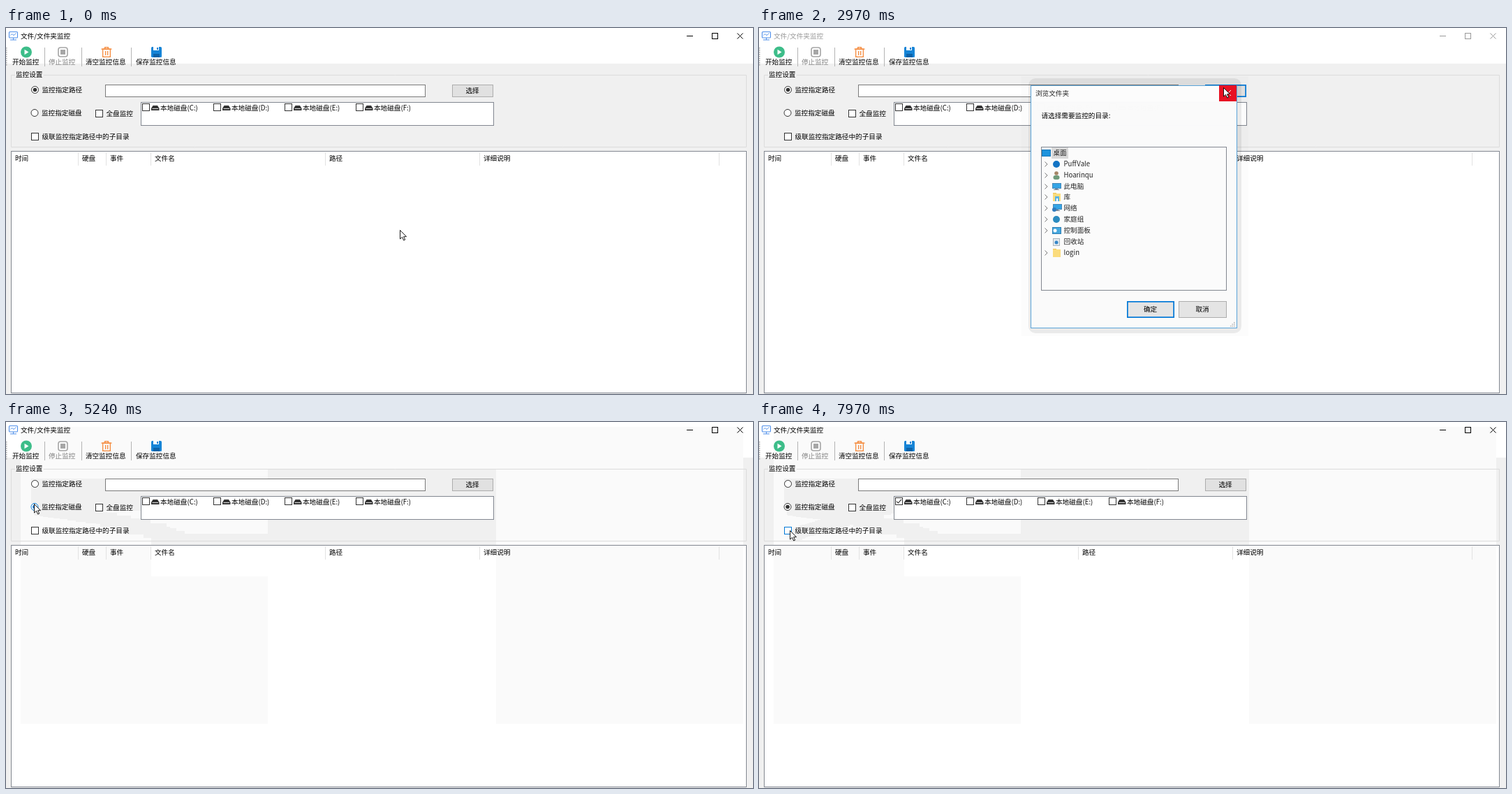
Animation of 1070x524 px, one loop 8000 ms. Source, as an HTML page with a canvas:

```html
<!DOCTYPE html>
<html lang="zh-CN">
<head>
<meta charset="utf-8">
<style>
html, body { margin: 0; width: 100%; height: 100%; overflow: hidden; background: #f0f0f0; }
canvas { display: block; }
</style>
</head>
<body>
<canvas id="stage" width="1070" height="524"></canvas>
<script>
const c = document.getElementById('stage').getContext('2d');
const LOOP = 8000, BLUE = '#0078d7', STEP = 30;
const OPEN = 1730, CLOSE = 2970, PICK_DISKS = 5240, TICK_C = 6460;
const FONT = '9.65px "Noto Sans CJK SC", "Noto Sans CJK", "Noto Sans", sans-serif';
const clamp = v => Math.max(0, Math.min(1, v));
const easeOut = k => 1 - (1 - clamp(k)) ** 2;

// pointer moves: start, end, and where it goes
const MOVES = [
  [400, 940, 664, 69], [1150, 1420, 665, 85],
  [CLOSE, 3490, 643, 145], [3490, 3770, 316, 193],
  [4010, 4220, 220, 150], [4360, 4510, 129, 129], [4680, 5020, 40, 117],
  [5630, 6360, 196, 110], [6970, 7760, 57, 149], [7790, 7970, 44, 155]
];
function cursorAt(t) {
  let x = 564, y = 289;
  for (const [from, to, nx, ny] of MOVES) {
    const k = easeOut((t - from) / (to - from));
    x += (nx - x) * k;
    y += (ny - y) * k;
  }
  return [Math.round(x), Math.round(y)];
}

const COLUMNS = [['时间', 96], ['硬盘', 40], ['事件', 64], ['文件名', 250], ['路径', 221], ['详细说明', 343]];
let edge = 8;
const headers = COLUMNS.map(([label, width]) => ({ label, width, left: (edge += width) - width }));
const hotHeader = (x, y) => y >= 177 && y < 197 && headers.find(h => x >= h.left && x < h.left + h.width);

function box(x, y, w, h, fill, stroke, line = 1) {
  if (fill) { c.fillStyle = fill; c.fillRect(x, y, w, h); }
  if (stroke) {
    c.strokeStyle = stroke; c.lineWidth = line;
    c.strokeRect(x + line / 2, y + line / 2, w - line, h - line);
  }
}
function text(s, x, y, color = '#000', align = 'left') {
  c.font = FONT; c.fillStyle = color; c.textAlign = align;
  c.fillText(s, x, Math.round(y + 3));
}
function lines(color, width, ...paths) {
  c.strokeStyle = color; c.lineWidth = width; c.beginPath();
  for (const p of paths)
    for (let i = 0; i < p.length; i += 2) c[i ? 'lineTo' : 'moveTo'](p[i], p[i + 1]);
  c.stroke();
}
function poly(color, ...p) {
  c.fillStyle = color; c.beginPath();
  for (let i = 0; i < p.length; i += 2) c.lineTo(p[i], p[i + 1]);
  c.closePath(); c.fill();
}
function disc(x, y, r, fill, stroke) {
  c.beginPath(); c.arc(x, y, r, 0, 7);
  if (fill) { c.fillStyle = fill; c.fill(); }
  if (stroke) { c.strokeStyle = stroke; c.lineWidth = 1; c.stroke(); }
}
function rounded(x, y, w, h, r, fill, stroke, line = 1.5) {
  c.beginPath(); c.roundRect(x, y, w, h, r);
  if (fill) { c.fillStyle = fill; c.fill(); }
  if (stroke) { c.strokeStyle = stroke; c.lineWidth = line; c.stroke(); }
}
function cross(x, y, r, color) {
  lines(color, 1, [x - r, y - r, x + r, y + r], [x + r, y - r, x - r, y + r]);
}
function radio(x, y, on, hot) {
  const color = hot ? BLUE : '#333';
  disc(x, y, 5, '#fff', color);
  if (on) disc(x, y, 2.8, color);
}
function checkbox(x, y, on, hot) {
  box(x, y, 11, 11, '#fff', hot ? BLUE : '#333');
  if (on) lines('#222', 1.1, [x + 2, y + 5.5, x + 4.3, y + 8, x + 9, y + 2.8]);
}
function button(label, x, y, w, h, fill, border, line) {
  box(x, y, w, h, fill, border, line);
  text(label, x + w / 2 - .5, y + h / 2, '#000', 'center');
}

function background() {
  box(0, 0, 1070, 51, '#fff');
  box(0, 51, 1070, 473, '#f0f0f0');
  box(7, 176, 1054, 347, '#fff');
}

// pale wash left after the dialog closes; everything repainted later wipes it away
function wash(t) {
  if (t < CLOSE + 20) return;
  box(21, 7, 1035, 425, '#fafafa');
  c.save(); c.beginPath();
  c.rect(375, 67, 327, 376);
  if (t >= PICK_DISKS) c.rect(36, 81, 662, 46);
  for (let s = CLOSE + 2 * STEP; s <= t; s += STEP) {
    const [x0, y0] = cursorAt(s - STEP), [x1, y1] = cursorAt(s), hot = hotHeader(x1, y1);
    if (hot) c.rect(hot.left, 160, hot.width, 61);
    if (x0 !== x1 || y0 !== y1)
      c.rect(Math.min(x0, x1), Math.min(y0, y1), Math.abs(x1 - x0) + 10, Math.abs(y1 - y0) + 16);
  }
  c.clip(); background(); c.restore();
}

function titleBar(active) {
  const ink = active ? '#000' : '#999', blue = '#4f8fea';
  rounded(4.5, 5.5, 12, 8.5, 1, null, blue, 1.1);
  lines(blue, 1, [6.5, 10.5, 8.5, 8.5, 11, 10.5, 14.5, 7.5], [10.5, 14, 10.5, 17], [6, 17, 15, 17]);
  text('文件/文件夹监控', 21, 12, ink);
  box(975, 11, 9, 1, ink);
  box(1011, 7, 9, 9, null, ink);
  cross(1051.5, 11.5, 4, ink);
}

function toolbar() {
  for (let y = 28; y < 54; y += 3) box(0, y, 1.5, 1.5, '#aaa');
  for (const x of [55, 108, 179]) box(x, 28, 1, 27, '#b4b4b4');
  disc(29, 34.5, 8, '#3dbd89');
  poly('#fff', 26.5, 30.8, 26.5, 38.2, 32.5, 34.5);
  rounded(75, 28, 13, 13, 3, null, '#a6a6a6', 1.6);
  box(78, 31, 7, 7, '#a6a6a6');
  const orange = '#f58a3c';
  box(141, 27, 6, 4, null, orange, 1.3);
  box(138, 29.5, 12, 12.5, null, orange, 1.3);
  box(136.5, 29.5, 15, 1.3, orange);
  for (const x of [142, 145]) box(x, 33, 1.3, 6, orange);
  rounded(208, 27, 15, 15, 1.5, '#1684d6');
  box(211, 27, 8, 5, '#fff'); box(216, 28, 2, 3, '#1684d6'); box(211, 37, 9, 5, '#0d62a8');
  text('开始监控', 9, 49);
  text('停止监控', 61, 49, '#838383');
  text('清空监控信息', 114, 49);
  text('保存监控信息', 186, 49);
}

function driveIcon(x, y) {
  poly('#333', x + 2.5, y, x + 9, y, x + 11.5, y + 4, x + 11.5, y + 7, x, y + 7, x, y + 4);
  box(x + 1.5, y + 4, 8.5, 1, '#ddd');
}

function settings(t, x, y) {
  const over = (l, top, r, b) => x >= l && x <= r && y >= top && y <= b;
  const byDisk = t >= PICK_DISKS;
  lines('#dcdcdc', 1, [13, 67.5, 7.5, 67.5, 7.5, 170.5, 1060.5, 170.5, 1060.5, 67.5, 54, 67.5]);
  text('监控设置', 14, 66.5);
  radio(41.5, 88.5, !byDisk);
  text('监控指定路径', 51.5, 89);
  radio(41, 121.5, byDisk, over(35, 115, 109, 128));
  text('监控指定磁盘', 51, 122);
  checkbox(128, 117, false, over(128, 114, 182, 131));
  text('全盘监控', 143.5, 123);
  checkbox(36, 150, false, over(36, 150, 177, 163));
  text('级联监控指定路径中的子目录', 51.5, 156);
  box(142, 81, 459, 18, '#fff', '#7a7a7a');

  const hot = over(639, 81, 697, 98) && t < CLOSE;
  const focus = t >= OPEN - 60 && !byDisk, pressed = focus && t < OPEN;
  button('选择', 639, 81, 59, 18, pressed ? '#cce4f7' : hot ? '#e5f1fb' : '#e1e1e1',
    pressed ? '#005499' : hot || focus ? BLUE : '#adadad', focus ? 1.7 : 1);

  box(193, 106, 506, 34, '#fff', '#828790');
  [...'CDEF'].forEach((drive, i) => {
    const left = 195 + i * 102;
    checkbox(left, 108, i === 0 && t >= TICK_C);
    driveIcon(left + 13, 111);
    text(`本地磁盘(${drive}:)`, left + 26, 115);
  });
}

function fileList(x, y) {
  const hot = hotHeader(x, y);
  for (const h of headers) {
    if (h === hot) box(h.left, 177, h.width, 20, '#d9ebf9');
    text(h.label, h.left + 5, 187);
    box(h.left + h.width - 1, 178, 1, 19, '#e2e2e2');
  }
  box(7, 176, 1054, 347, null, '#828790');
}

function monitor(x, y) {
  box(x - 6, y - 5, 13, 8, '#35a5e6', '#4788b8');
  box(x - 2, y + 3, 4, 1, '#789');
  box(x - 4, y + 4, 8, 1, '#789');
}
function folder(x, y) {
  box(x - 5, y - 6, 5, 3, '#edc457');
  box(x - 5, y - 5, 11, 11, '#fbdc7d');
}
const TREE = [
  ['桌面', (x, y) => box(x - 6, y - 5, 13, 10, '#1d93dd', '#1b79ba')],
  ['PuffVale', (x, y) => disc(x, y, 5, '#1273c4')],
  ['Hoarinqu', (x, y) => { disc(x, y - 3, 2.8, '#a58565'); rounded(x - 4.5, y, 9, 6, 3, '#6f9b7a'); }],
  ['此电脑', monitor],
  ['库', (x, y) => { folder(x, y); box(x - 2, y - 1, 6, 7, '#5bb4e5'); box(x, y + 2, 2, 4, '#fff'); }],
  ['网络', (x, y) => { monitor(x + 1, y - 1); disc(x - 3, y + 2, 3, '#2f79bd'); }],
  ['家庭组', (x, y) => disc(x, y, 5, '#2a8bc0')],
  ['控制面板', (x, y) => { box(x - 6, y - 5, 13, 10, '#45a8df', '#2f7fb5'); disc(x - 2, y, 2.5, '#fff'); }],
  ['回收站', (x, y) => { box(x - 5, y - 5, 10, 11, '#e3e9ee', '#aab4bc'); disc(x, y + 1, 2.5, '#3386c8'); }],
  ['login', folder]
];

function dialog(t) {
  const alpha = clamp((t - OPEN) / 285) * (1 - clamp((t - CLOSE) / 230));
  if (!alpha) return;
  const scale = .93 + .07 * clamp(alpha * 1.25);
  c.save();
  c.globalAlpha = alpha;
  c.translate(537, 256); c.scale(scale, scale); c.translate(-537, -256);
  box(376, 69, 325, 372, 'rgba(0,0,0,.012)');
  rounded(386, 72, 305, 365, 10, 'rgba(0,0,0,.07)');
  box(389, 82, 296, 348, '#fafafa', '#5aa3d8');
  box(390, 83, 294, 22, '#fcfcfc');
  text('浏览文件夹', 396, 94, '#222');
  box(659, 82, 25, 23, '#e81123');
  cross(672, 93, 4, '#fff');
  text('请选择需要监控的目录:', 404.5, 126);
  box(404, 170, 266, 206, '#fbfbfb', '#828790');
  box(419, 171, 24, 16, '#d9d9d9');
  TREE.forEach(([label, icon], i) => {
    const y = Math.round(179 + i * 15.85), x = i ? 426 : 411;
    icon(x, y);
    text(label, x + 10.5, y, '#222');
    if (i && label !== '回收站') lines('#777', 1, [409.5, y - 3.5, 413, y, 409.5, y + 3.5]);
  });
  button('确定', 527, 391, 68, 24, '#e4e4e4', BLUE, 1.7);
  button('取消', 601, 391, 69, 24, '#e4e4e4', '#adadad');
  for (let i = 0; i < 3; i++)
    for (let j = 0; j <= i; j++) box(680 - j * 2.5, 421 + i * 2.5, 1.5, 1.5, '#b5b5b5');
  c.restore();
}

function pointer(x, y) {
  c.save(); c.translate(x + .5, y + .5);
  poly('#fff', 0, 0, 0, 12.5, 3, 9.8, 5.2, 14.5, 7.2, 13.6, 5.1, 9.2, 9, 9.2);
  c.strokeStyle = '#000'; c.lineWidth = .9; c.stroke();
  c.restore();
}

function frame(now) {
  const t = now % LOOP, [x, y] = cursorAt(t);
  background();
  wash(t);
  titleBar(t < OPEN || t >= CLOSE + 20);
  toolbar();
  settings(t, x, y);
  fileList(x, y);
  dialog(t);
  pointer(x, y);
  requestAnimationFrame(frame);
}
requestAnimationFrame(frame);
</script>
</body>
</html>
```
